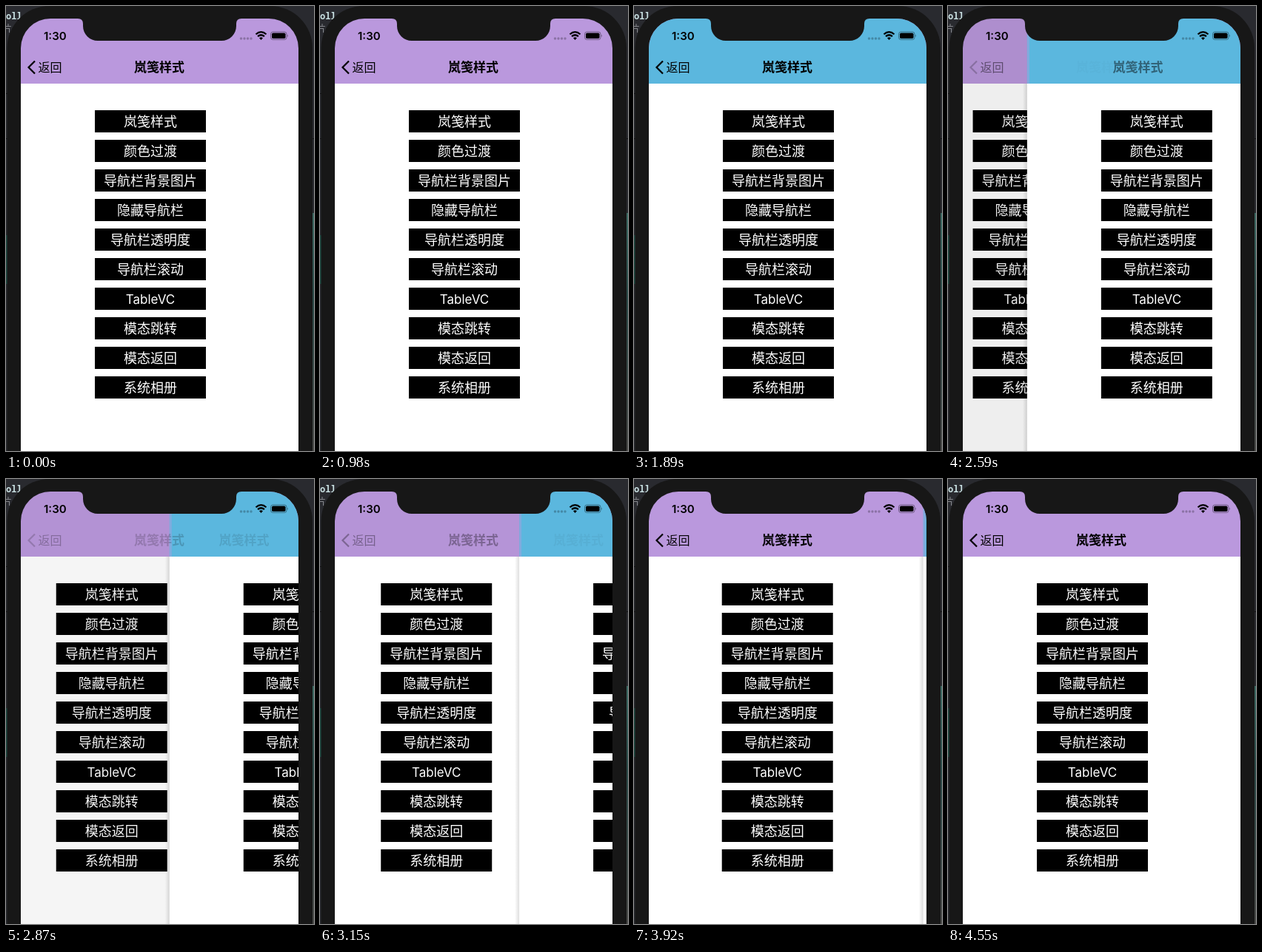
Recreate the animation shown at these times as an HTML page. Size 416 by 602 pixels, loop 4.69 s.

```html
<!DOCTYPE html>
<html lang="zh-CN">
<head>
<meta charset="utf-8">
<title>导航栏转场</title>
<style>
  html, body { margin: 0; width: 100%; height: 100%; overflow: hidden; background: #292a2f; }
  svg { display: block; width: 416px; height: 602px; }
  text { font-family: Inter, "Noto Sans CJK SC", "Noto Sans CJK", sans-serif; }
  .mono { font-family: "Noto Sans Mono", "Noto Sans CJK SC", monospace; }
  .title { font-size: 17px; font-weight: 600; text-anchor: middle; }
  .label { font-size: 18px; text-anchor: middle; fill: #fff; }
  .latin { font-size: 17px; }
</style>
</head>
<body>
<svg viewBox="0 0 416 602">
  <defs>
    <clipPath id="screen"><rect x="20" y="17" width="375" height="660" rx="40"/></clipPath>
    <linearGradient id="shade">
      <stop offset="0" stop-opacity="0"/>
      <stop offset="1" stop-opacity=".13"/>
    </linearGradient>
    <linearGradient id="desk" x2="0" y2="1">
      <stop offset="0" stop-color="#3d6b64"/>
      <stop offset=".35" stop-color="#2b4a48"/>
      <stop offset="1" stop-color="#4a4a48"/>
    </linearGradient>
  </defs>

  <rect width="416" height="602" fill="#292a2f"/>
  <rect y="310" width="3" height="66" fill="#1f4a42"/>
  <rect x="411" y="280" width="5" height="322" fill="url(#desk)"/>
  <path d="M0 118.500h4M0 179.500h4M412 179.500h4" stroke="#111"/>
  <text class="mono" x="0" y="18" font-size="12" font-weight="600" fill="#c8dfe1">oll</text>
  <text class="mono" x="-4" y="35" font-size="12" fill="#8b8d92">片</text>
  <rect x="1.500" y="0" width="412.500" height="700" rx="57" fill="#171717"/>

  <g clip-path="url(#screen)">
    <g id="under">
      <rect x="20" y="105" width="375" height="500" fill="#fff"/>
    </g>
    <rect id="dim" x="20" y="105" width="375" height="500"/>
    <rect x="20" y="17" width="375" height="88" fill="#ba98dd"/>
    <rect id="barDim" x="20" y="17" width="375" height="88"/>
    <g id="over">
      <rect x="20" y="105" width="375" height="500" fill="#fff"/>
      <rect x="20" y="17" width="375" height="88" fill="#5bb7de"/>
      <g id="edge">
        <rect x="14" y="105" width="6" height="500" fill="url(#shade)"/>
        <rect x="20" y="17" width="3" height="88" fill="#ba98dd" fill-opacity=".4"/>
      </g>
    </g>
    <text id="oldTitle" class="title" x="207" y="89">岚笺样式</text>
    <text id="newTitle" class="title" x="207" y="89">岚笺样式</text>
    <path id="chevron" d="M39 74.500L30.500 83L39 91.500" fill="none" stroke="#000" stroke-width="2.200"/>
    <text id="back" x="43.500" y="88.500" font-size="16">返回</text>

    <text x="51" y="45.500" font-size="15" font-weight="600">1:30</text>
    <g opacity=".25">
      <circle cx="317.500" cy="44" r="1.700"/><circle cx="322" cy="44" r="1.700"/>
      <circle cx="326.500" cy="44" r="1.700"/><circle cx="331" cy="44" r="1.700"/>
    </g>
    <g fill="none" stroke="#000" stroke-width="2.200">
      <path d="M337.500 38.300Q344.500 32 351.500 38.300M340 41.200Q344.500 37.300 349 41.200"/>
      <path d="M344.500 46L342 43.300Q344.500 41.300 347 43.300Z" fill="#000" stroke="none"/>
    </g>
    <rect x="357.500" y="35" width="21.500" height="10.500" rx="3" fill="none" stroke="#000" stroke-opacity=".4"/>
    <rect x="359" y="36.500" width="18.500" height="7.500" rx="1.700"/>
    <path d="M380.200 38.500q1.600 1.700 0 3.500z" fill-opacity=".5"/>
  </g>
  <path d="M97 16v1q7 0 7 7v3a20 20 0 0 0 20 20h167a20 20 0 0 0 20-20v-3q0-7 7-7v-1z" fill="#171717"/>
</svg>
<script>
const $ = id => document.getElementById(id);
const NS = 'http://www.w3.org/2000/svg';
const LOOP = 4690, W = 375;
const PUSH = 1020, DRAG = 2290, RELEASE = 3570;
const drag = [[DRAG, 0], [2590, 86.5], [2870, 200.5], [3150, 249], [3430, 270], [RELEASE, 276]];
const labels = ['岚笺样式', '颜色过渡', '导航栏背景图片', '隐藏导航栏', '导航栏透明度',
  '导航栏滚动', 'TableVC', '模态跳转', '模态返回', '系统相册'];

function add(parent, tag, attrs, text = '') {
  const el = document.createElementNS(NS, tag);
  for (const key in attrs) el.setAttribute(key, attrs[key]);
  el.textContent = text;
  parent.append(el);
}

for (const page of [$('under'), $('over')]) {
  labels.forEach((label, i) => {
    const type = /^\w+$/.test(label) ? 'label latin' : 'label';
    add(page, 'rect', { x: 120, y: 141 + 40 * i, width: 150, height: 30 });
    add(page, 'text', { class: type, x: 195, y: 162.5 + 40 * i }, label);
  });
}
// Shadow and bar seam stay above the page's own parts
$('over').append($('edge'));

// Remaining distance of a critically damped spring, from 1 to 0
const spring = (ms, rate) => (1 + rate * ms / 1000) * Math.exp(-rate * ms / 1000);

function slope(i) {
  if (i === 0) return 0.1;
  const a = drag[i - 1], b = drag[Math.min(i + 1, drag.length - 1)];
  return (b[1] - a[1]) / (b[0] - a[0]);
}

function dragAt(t) {
  let i = 0;
  while (t > drag[i + 1][0]) i++;
  const [t0, x0] = drag[i], [t1, x1] = drag[i + 1];
  const d = t1 - t0, u = (t - t0) / d, v = 1 - u;
  return v * v * (1 + 2 * u) * x0 + u * u * (3 - 2 * u) * x1
    + d * u * v * (v * slope(i) - u * slope(i + 1));
}

// Left edge of the upper page, relative to the screen
function edgeAt(t) {
  if (t < PUSH) return W;
  if (t < DRAG) return W * spring(t - PUSH, 15.9);
  if (t < RELEASE) return dragAt(t);
  return W - (W - dragAt(RELEASE)) * spring(t - RELEASE, 14);
}

function draw(t) {
  let x = edgeAt(t);
  if (x < 0.2) x = 0;
  if (x > W - 0.2) x = W;
  const p = x / W, dim = 0.085 * (1 - p);
  const newAlpha = (1 - p) ** (t < DRAG ? 1.2 : 3);
  const oldAlpha = p ** 2.8;
  const either = (a, b) => 1 - (1 - a) * (1 - b);
  const move = (id, dx) => $(id).setAttribute('transform', `translate(${dx.toFixed(2)} 0)`);
  const fade = (id, a) => $(id).setAttribute('opacity', a.toFixed(3));

  move('under', -0.3 * W * (1 - p));
  move('over', x);
  move('newTitle', 0.57 * x);
  fade('dim', p > 0.65 ? 0 : dim);
  fade('barDim', dim);
  fade('edge', p < 1 ? Math.min(1, x / 8) : 0);
  fade('newTitle', newAlpha);
  fade('oldTitle', oldAlpha);
  fade('back', either(newAlpha, oldAlpha));
  fade('chevron', either(newAlpha ** 2, oldAlpha));
}

const start = performance.now();
function tick() {
  draw((performance.now() - start) % LOOP);
  requestAnimationFrame(tick);
}
tick();
</script>
</body>
</html>
```
